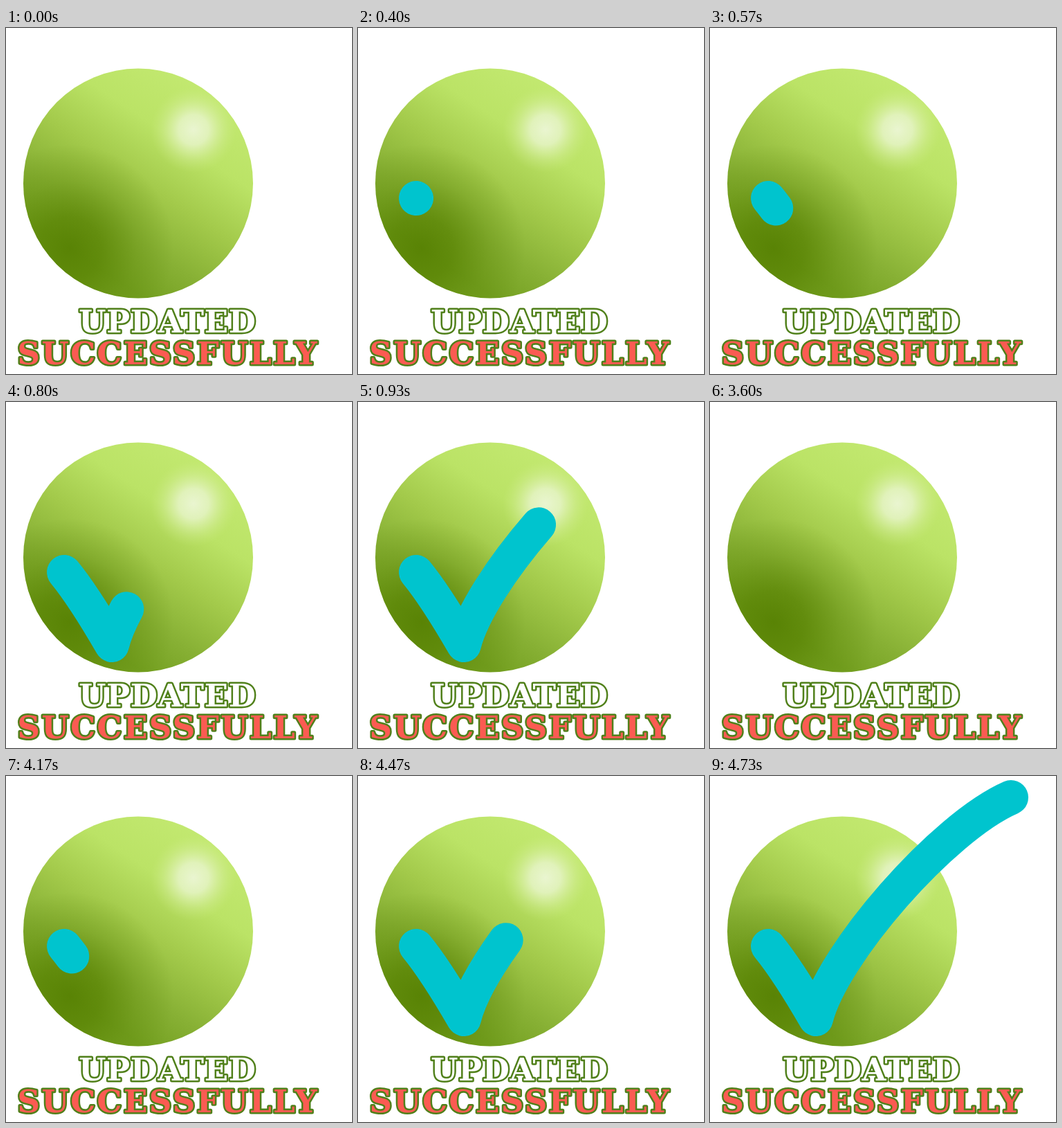
An HTML page with a canvas for the animation above (7210 ms loop, 500 by 500 pixels).

```html
<!DOCTYPE html>
<html lang="en">
<head>
<meta charset="utf-8">
<title>Updated successfully</title>
<style>
  html, body { margin: 0; width: 100%; height: 100%; overflow: hidden; background: #fff; }
  canvas { display: block; width: 100vw; height: 100vh; }
</style>
</head>
<body>
<canvas id="stage" width="500" height="500"></canvas>
<script>
const ctx = document.getElementById('stage').getContext('2d');
const LOOP = 7210;
const CYCLE = 3600;
const START = 400;
const STEPS = 22;
const RAMP = 14.6; // steps until the pen reaches full speed

const TICK = 'M84 246Q112 280 153 351C176 258 336 74 435 31';
const tickPath = new Path2D(TICK);
const probe = document.createElementNS('http://www.w3.org/2000/svg', 'path');
probe.setAttribute('d', TICK);
const tickLength = probe.getTotalLength();

function withStops(gradient, stops) {
  for (const [at, color] of stops) gradient.addColorStop(at, color);
  return gradient;
}

function glow(x, y, r, stops) {
  return withStops(ctx.createRadialGradient(x, y, 0, x, y, r), stops);
}

const ballFills = [
  withStops(ctx.createLinearGradient(290, 80, 119, 337), [
    [0, '#c3e971'], [0.3, '#bbe366'], [0.55, '#a3ca4b'], [0.8, '#87b034'], [1, '#74a021']
  ]),
  glow(92, 318, 150, [
    [0, 'rgba(84,126,0,0.85)'], [0.3, 'rgba(86,128,0,0.68)'],
    [0.65, 'rgba(90,132,4,0.28)'], [1, 'rgba(90,132,4,0)']
  ]),
  glow(271, 147, 62, [
    [0, 'rgba(236,246,214,0.95)'], [0.35, 'rgba(233,245,206,0.8)'],
    [0.7, 'rgba(224,242,180,0.3)'], [1, 'rgba(210,238,140,0)']
  ])
];

function drawBall() {
  ctx.beginPath();
  ctx.arc(191, 224.5, 166, 0, Math.PI * 2);
  for (const fill of ballFills) {
    ctx.fillStyle = fill;
    ctx.fill();
  }
}

function drawLabel(text, baseline, fill, spacing) {
  ctx.font = 'bold 45px "DejaVu Serif", serif';
  ctx.letterSpacing = spacing + 'px';
  ctx.textAlign = 'center';
  ctx.lineJoin = 'round';
  ctx.lineWidth = 5;
  ctx.strokeStyle = '#50801a';
  ctx.strokeText(text, 233 + spacing / 2, baseline);
  ctx.fillStyle = fill;
  ctx.fillText(text, 233 + spacing / 2, baseline);
}

// Speed rises as a smoothstep over RAMP steps, then stays constant.
function progress(step) {
  const u = Math.min(step / RAMP, 1);
  const eased = RAMP * (u ** 3 - u ** 4 / 2);
  return (eased + Math.max(step - RAMP, 0)) / (STEPS - RAMP / 2);
}

function drawTick(time) {
  if (time < START) return;
  const ticks = Math.floor((time - START) / 10);
  const step = Math.min(Math.floor(ticks * 0.3 + 0.1001), STEPS);
  ctx.save();
  ctx.lineWidth = 50;
  ctx.lineCap = ctx.lineJoin = 'round';
  ctx.strokeStyle = '#00c4ce';
  if (step < STEPS) {
    ctx.setLineDash([Math.max(progress(step) * tickLength, 0.1), tickLength * 2]);
  }
  ctx.stroke(tickPath);
  ctx.restore();
}

function render(now) {
  const time = now % LOOP;
  ctx.fillStyle = '#fff';
  ctx.fillRect(0, 0, 500, 500);
  drawBall();
  drawLabel('UPDATED', 440, '#fff', 0.7);
  drawLabel('SUCCESSFULLY', 486, '#fb5b52', 2.5);
  drawTick(time < CYCLE ? time : time - CYCLE);
}

const origin = performance.now();
function frame() {
  render(performance.now() - origin);
  requestAnimationFrame(frame);
}
frame();
</script>
</body>
</html>
```
